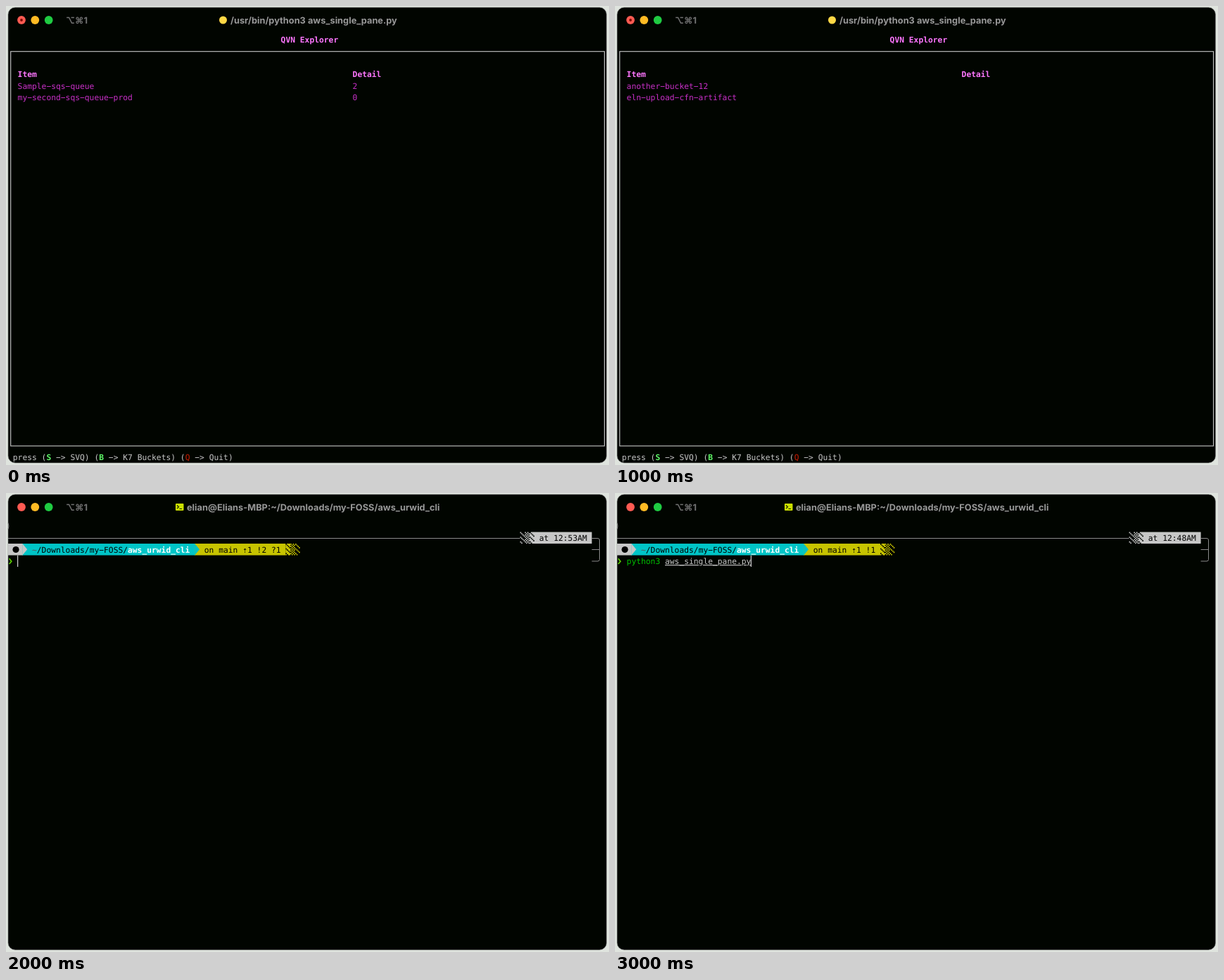
An HTML page for the animation above (4000 ms loop, 857x653 px).

```html
<!DOCTYPE html>
<html lang="en">
<head>
<meta charset="utf-8">
<title>Terminal</title>
<style>
  html, body { margin: 0; width: 100%; height: 100%; overflow: hidden; background: #dfe4de; }
  svg { display: block; }
  text { font: 11.3px "DejaVu Sans Mono", monospace; white-space: pre; fill: #c7c7c7; text-rendering: geometricPrecision; }
  .bold { font-weight: 700; }
  .bar { font: 700 12.8px Inter, "DejaVu Sans", sans-serif; }
</style>
</head>
<body>
<svg id="stage" width="857" height="653" viewBox="0 0 857 653"></svg>
<script>
const CW = 6.8, RH = 16.52;
const GREY = '#c7c7c7', CYAN = '#00c5c7', YELLOW = '#c7c400', MAGENTA = '#c930c7', PINK = '#ff76ff', LIME = '#5ffa68';
const colX = c => 3 + c * CW;
const rowY = r => 39 + r * RH;

// The terminal face has wide hyphens, so they are set as minus signs.
const text = (c, r, s, fill = GREY, extra = '') =>
  `<text x="${colX(c)}" y="${rowY(r) + 12.5}" style="fill:${fill}" ${extra}>${s.replace(/-/g, '−')}</text>`;
const bold = (c, r, s, fill) => text(c, r, s, fill, 'class="bold"');
const span = (s, fill, cls = '') => `<tspan class="${cls}" style="fill:${fill}">${s}</tspan>`;
const block = (c, r, n, fill) =>
  `<rect x="${colX(c)}" y="${rowY(r)}" width="${n * CW}" height="${RH}" fill="${fill}"/>`;
const arrow = (c, r, fill) =>
  `<path d="M${colX(c)} ${rowY(r)}l${CW} ${RH / 2}l${-CW} ${RH / 2}z" fill="${fill}"/>`;
const line = (d, stroke = '#8a8a8a', width = 1) =>
  `<path d="${d}" fill="none" stroke="${stroke}" stroke-width="${width}"/>`;
const circle = (x, y, r, fill) => `<circle cx="${x}" cy="${y}" r="${r}" fill="${fill}"/>`;
const bar = (x, s, fill = '#989898') => `<text class="bar" x="${x}" y="24.6" style="fill:${fill}">${s}</text>`;

// One dithered cell; level 1 to 3 covers a quarter to three quarters.
function shade(c, r, level, fill) {
  const w = CW / 4, h = RH / 10;
  let d = '';
  for (let y = 0; y < 10; y++) for (let x = 0; x < 4; x++) {
    const sparse = (x + 3 * y) % 4 === 0;
    if ([sparse, (x + y) % 2 === 0, !sparse][level - 1])
      d += `M${colX(c) + x * w} ${rowY(r) + y * h}h${w}v${h}h${-w}z`;
  }
  return `<path d="${d}" fill="${fill}"/>`;
}

const frame = '<rect x="3" y="2" width="850.5" height="648" rx="10" fill="#010500" stroke="#777" stroke-width=".6"/>'
  + circle(22, 20, 5.9, '#ff5b52') + circle(41.3, 20, 5.9, '#ffbb24') + circle(60.7, 20, 5.9, '#1fcb42')
  + bar(85, '⌥⌘1', '#727272');

function explorer(rows) {
  const help = `press (${span('S', LIME, 'bold')} -&gt; SVQ) (${span('B', LIME, 'bold')} -&gt; K7 Buckets) (${span('Q', '#c91b00')} -&gt; Quit)`;
  return circle(22, 20, 1.9, '#7d0a05') + circle(308.5, 20, 5.5, '#ffd845')
    + bar(319, '/usr/bin/python3 aws_single_pane.py')
    + bold(57, 0, 'QVN Explorer', PINK)
    + `<rect x="6.7" y="64.7" width="843.8" height="561.2" fill="none" stroke="${GREY}" stroke-width="1.1"/>`
    + bold(2, 3, 'Item', PINK) + bold(72, 3, 'Detail', PINK)
    + rows.map(([item, detail], i) => text(2, 4 + i, item, MAGENTA) + text(72, 4 + i, detail, MAGENTA)).join('')
    + text(1, 36, help);
}

function shell(time, status, command, cursorCol) {
  const end = 42 + status.length;
  const x = colX(cursorCol);
  return '<rect x="241" y="15" width="11.5" height="10" rx="1" fill="#cbe000"/>'
    + line('M243 17.5l2.5 2.3l-2.5 2.3M246.5 22.5h3.5', '#1c2000', 1.2)
    + bar(257, 'elian@Elians-MBP:~/Downloads/my-FOSS/aws_urwid_cli')
    + line('M3 42.5q1.8 4.5 0 9')
    + line('M3 64.5H730.6M832.6 64.5H841q2.5 0 2.5 2.5V94.5q0 2.5-2.5 2.5H832.6M832.6 80.5H843.5')
    + [1, 2, 3].map(n => shade(106 + n, 1, n, GREY) + shade(end + 3 - n, 2, n, YELLOW)).join('')
    + block(110, 1, 12, GREY) + text(111, 1, 'at ' + time, '#000')
    + block(0, 2, 3.1, GREY) + block(3, 2, 36.1, CYAN) + block(39, 2, end - 39, YELLOW)
    + arrow(3, 2, GREY) + arrow(39, 2, CYAN)
    + circle(14, 80.5, 4.6, '#000')
    + text(5, 2, span('~', '#555') + '/Downloads/my-FOSS/', '#000')
    + bold(25, 2, 'aws_urwid_cli', '#fff')
    + text(41, 2, status, '#000')
    + line('M4.6 93.3l3.2 3.9l-3.2 3.9', '#5fd700', 1.6)
    + command + line(`M${x} 88.7V105`, GREY, 1.3);
}

const scenes = [
  explorer([['Sample-sqs-queue', '2'], ['my-second-sqs-queue-prod', '0']]),
  explorer([['another-bucket-12', ''], ['eln-upload-cfn-artifact', '']]),
  shell('12:53AM', 'on main ⇡1 !2 ?1', '', 2),
  shell('12:48AM', 'on main ⇡1 !1',
    text(2, 3, 'python3', '#00c200') + text(10, 3, 'aws_single_pane.py', GREY, 'text-decoration="underline"'), 28),
];

const stage = document.getElementById('stage');
stage.innerHTML = frame + scenes.map(s => `<g>${s}</g>`).join('');
const groups = stage.querySelectorAll('g');
const start = performance.now();

function draw(now) {
  const current = Math.floor(Math.max(0, now - start) / 1000) % scenes.length;
  groups.forEach((g, i) => g.style.display = i === current ? '' : 'none');
  requestAnimationFrame(draw);
}
draw(start);
</script>
</body>
</html>
```
